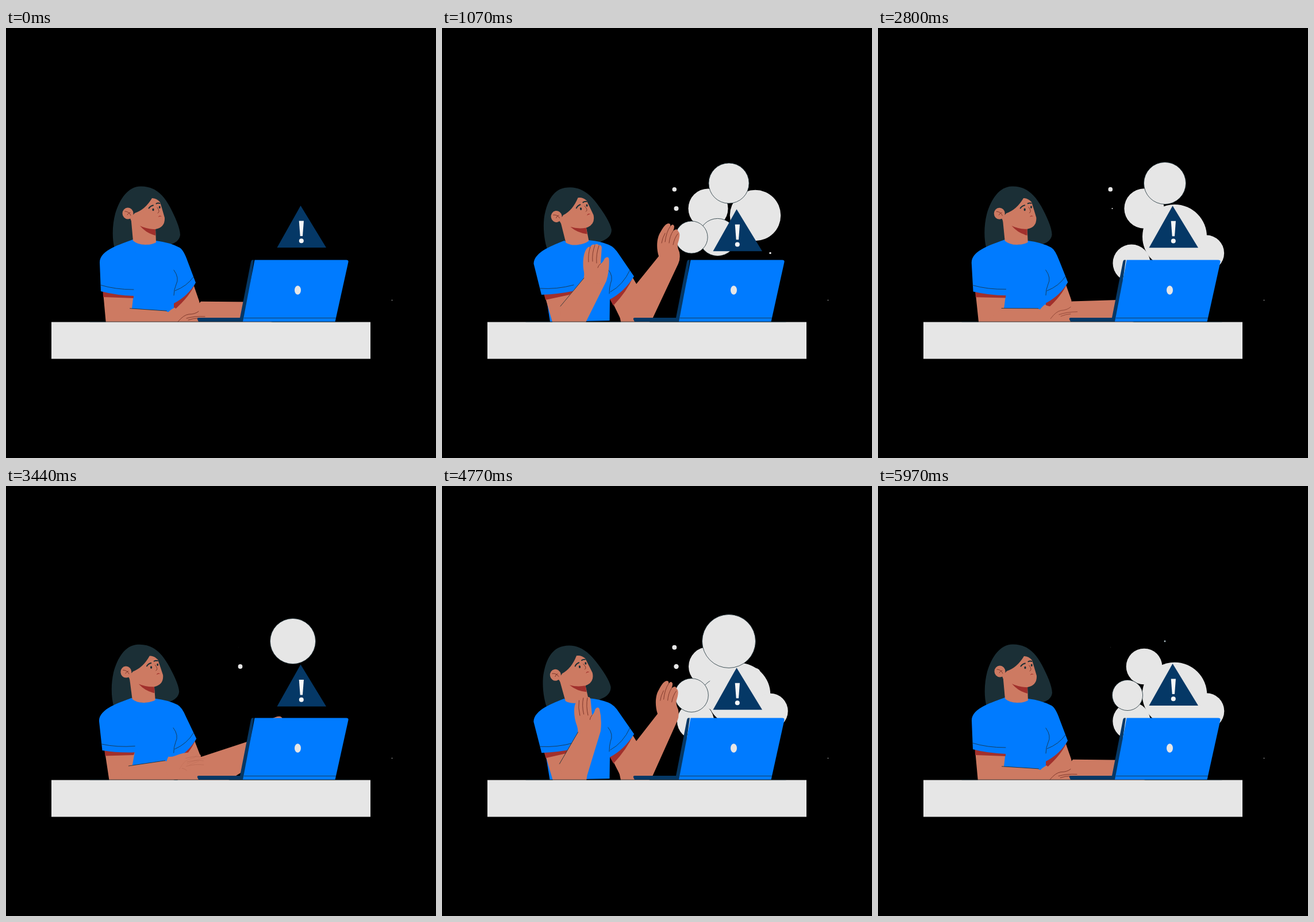
An HTML page that plays this animation: 748x748 px, repeating every 6.01 s.

```html
<!DOCTYPE html>
<html lang="en">
<head>
<meta charset="utf-8">
<title>Laptop warning</title>
<style>
  html, body { margin: 0; width: 100%; height: 100%; overflow: hidden; background: #000; }
  svg { display: block; width: 100vw; height: 100vh; }
  .skin { fill: #cd7a62; }
  .hair { fill: #1b2f36; }
  .blue { fill: #007bff; }
  .navy { fill: #053866; }
  .grey { fill: #e6e6e6; }
  .red { fill: #a1302c; }
  .line { fill: none; stroke: #1b2f36; stroke-width: .8; stroke-linecap: round; }
  .crease { fill: none; stroke: #6e2a20; stroke-width: .8; stroke-linecap: round; }
  .brow { fill: none; stroke: #1b2f36; stroke-width: 2; stroke-linecap: round; }
</style>
</head>
<body>
<svg viewBox="0 0 748 748">
  <rect width="748" height="748"/>
  <g id="smoke" class="grey"></g>
  <circle class="grey" cx="671.5" cy="473.5" r=".7"/>

  <g id="sign">
    <path class="navy" d="M512.5 309L557 382H471.5Z"/>
    <path fill="#f7f7f7" d="M509.7 335.5H518L516 362H511.7Z"/>
    <circle fill="#f7f7f7" cx="513.8" cy="370.2" r="4"/>
  </g>

  <g class="head">
    <path class="hair" d="M189 384C184 366 185 342 190 323C198 297 212 276 234 275.500C258 275 273 289 285 311C294 328 303 348 303 360C302 369 294 375 284 377L240 390Z"/>
  </g>

  <path id="backUpper" class="skin"/>
  <g id="backArm">
    <path class="skin" d="M306 485L377 397C372 381 374 364 380 355Q388 340 394 340Q398 340 397 345Q402 339 404 345Q404 349 402 353Q409 347 411 354Q416 358 410 375Q409 381 413 390Q415 402 411 410L365 508L332 540L312 516Z"/>
    <path class="crease" d="M397 345Q390 355 388 372M402 353Q396 362 395 374M410 358Q404 366 402 377M388 357Q383 366 382 374"/>
  </g>
  <path id="backShade" class="red"/>

  <path id="torso" class="blue"/>
  <path id="frontUpper" class="skin"/>
  <path id="frontShade" class="red"/>
  <path id="sleeve" class="blue"/>
  <path id="seams" class="line"/>

  <g class="head">
    <path class="skin" d="M217 326L221 370Q229 377 242 377Q254 377 261 373L260 346L236 320Z"/>
    <path class="red" d="M233 344Q244 357 260 361V346Z"/>
    <path class="skin" d="M216 331L224 322Q242 316 254 296Q262 296 268 303Q272 316 276 330Q277 347 260 350Q245 350 233 344L219 338Z"/>
    <ellipse class="skin" cx="212" cy="322.500" rx="9.500" ry="10"/>
    <path class="crease" d="M207 319Q214 319 217 326M211 325Q213 321 216 321"/>
    <ellipse class="hair" cx="256" cy="316" rx="1.600" ry="2.300"/>
    <ellipse class="hair" cx="267.300" cy="311.800" rx="1.500" ry="2.200"/>
    <path class="brow" d="M248.500 313.500Q251 309.500 256 308.500M261.500 305.500Q264 304 267.500 305"/>
    <path class="crease" d="M263 312Q269 320 264 322"/>
    <path class="red" d="M264.500 329Q267 324.500 271 328Q268 327 264.500 329Z"/>
  </g>

  <g id="frontArm">
    <path class="skin" d="M207 483L246 436Q265 425 286 440L250 512L244 530H205Z"/>
    <g id="frontHand">
      <path class="skin" d="M246 436Q248 432 247 424C244 410 246 392 251 385Q255 379 258 381Q261 375 266 377Q270 374 273 378Q278 377 278 383L276 410Q280 408 283 401Q288 396 290.500 401Q292 420 286 440Q266 452 246 436Z"/>
      <path id="fingers" class="crease" d="M258 381Q254 393 255 407M266 378Q261 391 262 406M273 379Q268 393 269 409M276 410Q272 413 271 417"/>
    </g>
    <path class="line" d="M206 484L247 435"/>
  </g>
  <path id="restingHand" class="crease" d="M299 511Q309 499 318 498Q329 498 335 493M314 505Q328 501 346 502M317 508Q326 505 334 505"/>

  <path class="navy" d="M431 403.500H428Q426.500 404 426 407L407 504H335Q332 504 333 507L335 511H416Z"/>
  <path class="blue" d="M432.500 403.500H592Q596 403.500 595.500 407L572.500 511H412Z"/>
  <path class="line" d="M414 504.500H573.500"/>
  <ellipse class="grey" cx="507.500" cy="456" rx="5.500" ry="7.700"/>
  <rect class="grey" x="79" y="511.500" width="555" height="64"/>
  <path class="line" d="M146 511H598"/>
</svg>
<script>
const LOOP = 6010, SWAY = LOOP / 2, PUFFS = 3420, PUFF_OFFSET = 835;
const byId = id => document.getElementById(id);

// Back to front; each start is a moment within the puff cycle.
const puffs = [
  { x: 463, y: 314, r: 35.3, starts: [1410, 3120], life: 1100, tau: 140 },
  { x: 545, y: 326, r: 45, starts: [2897], life: 1070, tau: 80 },
  { x: 479.5, y: 364, r: 33, starts: [3215], life: 920, tau: 100, edge: true },
  { x: 516, y: 363, r: 56.3, starts: [235], life: 2080, tau: 70 },
  { x: 571, y: 391.5, r: 31.3, starts: [232], life: 2080, tau: 70 },
  { x: 441, y: 409, r: 32.7, starts: [235], life: 2080, tau: 70 },
  { x: 434, y: 364, r: 30, starts: [890, 3215], life: 1045, tau: 160, edge: true },
  { x: 499, y: 270, r: 50, starts: [0, 1710], life: 1070, tau: 195, edge: true },
  { x: 404.3, y: 280.7, r: 4, starts: [0, 1710], life: 900, tau: 80 },
  { x: 407.5, y: 314, r: 4.2, starts: [50, 1948], life: 900, tau: 60 }
];

for (const puff of puffs) {
  puff.node = document.createElementNS('http://www.w3.org/2000/svg', 'circle');
  puff.node.setAttribute('cx', puff.x);
  puff.node.setAttribute('cy', puff.y);
  if (puff.edge) {
    puff.node.setAttribute('stroke', '#1b2f36');
    puff.node.setAttribute('stroke-width', .8);
  }
  byId('smoke').append(puff.node);
}

// Outlines at rest and with the hands raised.
const shapes = {
  backUpper: [
    'M292 478L326 446L336 475L344 515L292 515Z',
    'M293 470L331 433L338 445L352 515L315 515Z'],
  backShade: [
    'M291 476L329 444Q321 466 291 492Z',
    'M291 470L333 432Q322 458 298 483Z'],
  torso: [
    'M221 368C204 376 186 381 176 388L200 460L200 511L292 511L292 479Q317 466 330 443L316 406Q309 386 302 382Q285 373 261 370Q240 384 221 368Z',
    'M213 370C199 376 182 383 172 390L180 460L188 511L291.500 509L292 472Q317 459 334 432L308 394Q300 381 290 377Q276 371 255 369Q235 384 213 370Z'],
  frontUpper: [
    'M169 460L222 462L219 488L219 515L174 515Z',
    'M178 463L230 455L220 490L250 515L193 515Z'],
  frontShade: [
    'M168.500 457L222 463L222 470L169 468Z',
    'M177 462L231 455L222 464L180 473Z'],
  sleeve: [
    'M221 368C200 376 163 386 163 408L165 458Q192 465 222 466L230 410Z',
    'M213 370C195 377 160 389 159.500 410L173 464Q203 463 231 457L232 410Z'],
  seams: [
    'M164 447Q190 455 222 455M294 457Q315 449 326 433M292 421Q302 435 296 446Q292 455 292 465',
    'M170 453Q200 455 229 447M293 459Q315 447 327 421M289 420Q299 432 293 445Q291 452 291 462']
};
const numbers = /-?\d+(\.\d+)?/g;

function blend([rest, raised], k) {
  const ends = raised.match(numbers);
  let i = 0;
  return rest.replace(numbers, n => (+n + (ends[i++] - n) * k).toFixed(2));
}

const wave = t => (1 - Math.cos(2 * Math.PI * t / SWAY)) / 2;
const settle = t => Math.sin(wave(t) * Math.PI / 2);
const wrap = (n, size) => ((n % size) + size) % size;

function puffSize(t, start, { r, life, tau }) {
  const age = wrap(t - PUFF_OFFSET - start, PUFFS);
  if (age > life || age > t) return 0; // the air is clear when the loop begins
  const shrink = Math.max(0, (age - life + 420) / 420);
  return r * (1 - Math.exp(-age / tau)) * (1 - shrink ** 3);
}

function draw(t) {
  const lean = wave(t) / .81;
  const body = settle(t) / .956;
  const back = settle(t + 42) / .97;
  const front = wave(t - 18) / .794;
  const setTransform = (id, value) => byId(id).setAttribute('transform', value);

  for (const puff of puffs) {
    const r = Math.max(...puff.starts.map(start => puffSize(t, start, puff)));
    puff.node.setAttribute('r', r);
    puff.node.style.display = r > .05 ? '' : 'none';
  }

  for (const id in shapes) byId(id).setAttribute('d', blend(shapes[id], body));
  for (const head of document.querySelectorAll('.head'))
    head.setAttribute('transform', `rotate(${-9 * lean} 240 407)`);

  const low = 1 - front;
  setTransform('sign', `translate(0 ${7.7 * wave(t)})`);
  setTransform('backArm', `rotate(${51.7 * (1 - back)} 332 514.5)`);
  setTransform('frontArm', `translate(${10 * low} ${5 * low}) rotate(${54 * low} 207 483)`);
  setTransform('frontHand', `rotate(${60 * Math.max(0, low) ** 2} 262 432)`);
  setTransform('restingHand', `rotate(${-54 * front} 213 488)`);
  byId('restingHand').style.opacity = Math.max(0, 1 - 4 * front);
  byId('fingers').style.opacity = Math.min(1, Math.max(0, 3 * front - .5));
}

const begin = performance.now();
function tick() {
  draw((performance.now() - begin) % LOOP);
  requestAnimationFrame(tick);
}
tick();
</script>
</body>
</html>
```
